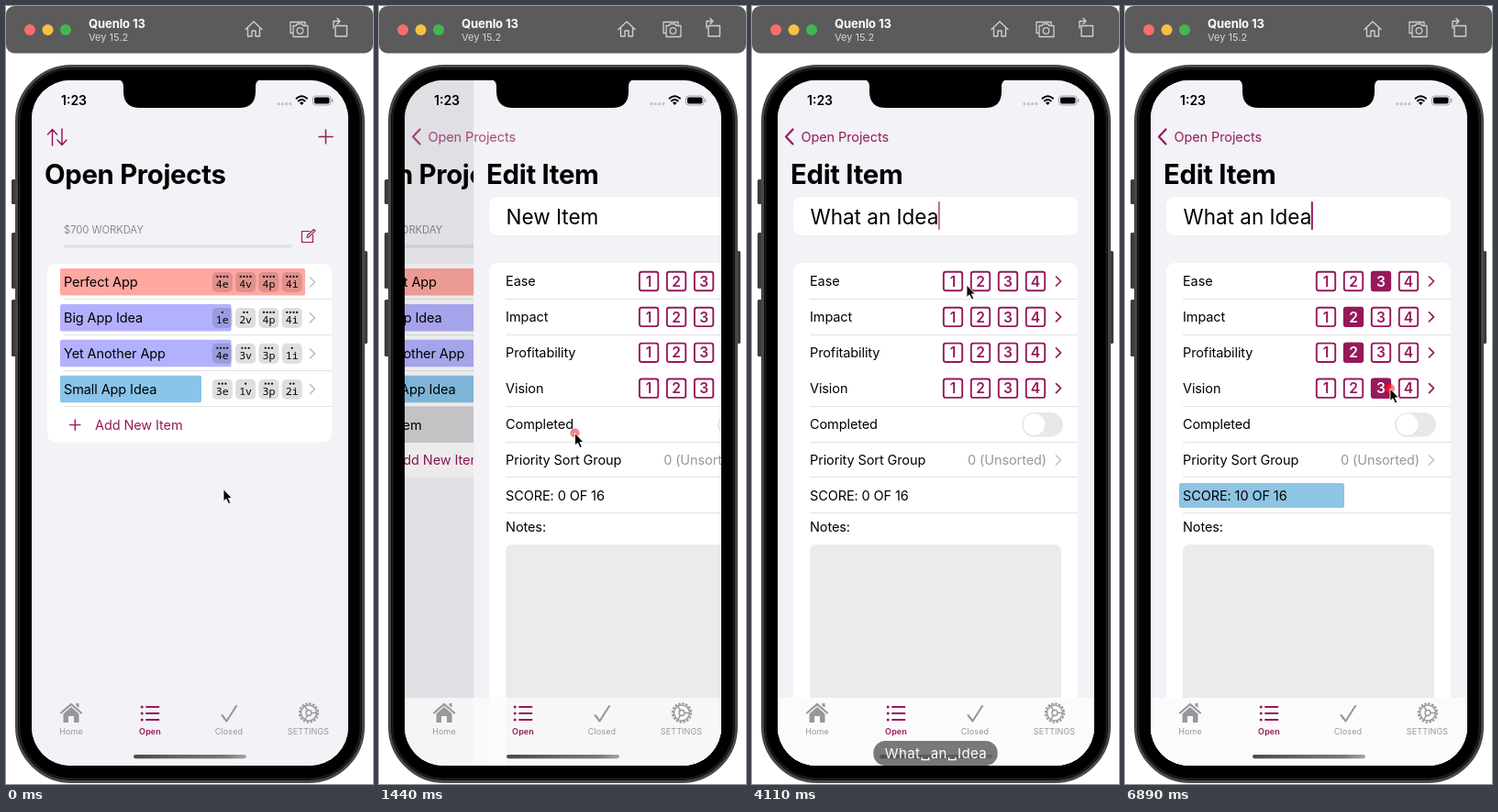
Recreate the animation shown at these times as an HTML page. Size 400 by 848 pixels, loop 7.39 s.

```html
<!DOCTYPE html>
<html lang="en">
<head>
<meta charset="utf-8">
<title>Item rating demo</title>
<style>
html, body { margin: 0; width: 100%; height: 100%; overflow: hidden; background: #fff; }
svg { display: block; width: 100%; height: 100%; }
text { font: 14.5px Inter, "Open Sans", sans-serif; letter-spacing: -.1px; white-space: pre; }
.title { font-size: 29.3px; font-weight: 700; letter-spacing: -.3px; }
.field { font-size: 22.5px; letter-spacing: 0; }
.chip { font: 11.6px "Noto Sans Mono", "DejaVu Sans Mono", monospace; letter-spacing: 0; }
.tab { font-size: 9px; letter-spacing: .1px; }
.active { font-weight: 600; }
.keys { font-size: 15px; letter-spacing: .4px; }
.num { font-size: 15.5px; font-weight: 600; letter-spacing: 0; }
.tint { fill: #96195a; }
.line { fill: none; stroke-linecap: round; stroke-linejoin: round; }
.glow { mix-blend-mode: screen; }
</style>
</head>
<body>
<svg id="stage" viewBox="0 0 400 848"></svg>
<script>
const TINT = '#96195a', BG = '#f2f2f7';
const TICK = 1000 / 9, LOOP = 7390, LAST = 62;
const PITCH = 38.9;
const PHRASE = 'What an Idea';

const rect = (x, y, w, h, r, fill, more = '') =>
  `<rect x="${x}" y="${y}" width="${w}" height="${h}" rx="${r}" fill="${fill}" ${more}/>`;
const dot = (x, y, r, fill, more = '') =>
  `<circle cx="${x}" cy="${y}" r="${r}" fill="${fill}" ${more}/>`;
const text = (x, y, s, more = '') => `<text x="${x}" y="${y}" ${more}>${s}</text>`;
const line = (d, color, w = 1.5, more = '') =>
  `<path class="line" d="${d}" stroke="${color}" stroke-width="${w}" ${more}/>`;
const group = (id, body, more = '') => `<g id="${id}" ${more}>${body}</g>`;
const chevron = (y, color) => line(`M331.5 ${y - 5}l5 5-5 5`, color, 1.7);
const rule = y => rect(63, y, 292, 1, 0, '#e2e2e5');

// Simulator title bar and phone body
function chrome() {
  const c = '#cfcfcf';
  return rect(0, 0, 400, 51.5, 9, '#5b5b5b') +
    dot(26, 26, 6, '#fa6d6c') + dot(45.5, 26, 6, '#f7c043') + dot(65, 26, 6, '#40b850') +
    text(90, 24, 'Quenlo 13', 'fill="#fff" style="font-size:13px;font-weight:700"') +
    text(90, 38, 'Vey 15.2', 'fill="#d4d4d4" style="font-size:11px;letter-spacing:0"') +
    line('M261 25.500l9-8.500 9 8.500M263.500 24v9h4.500v-6h4v6h4.500v-9', c, 1.4) +
    line('M312.500 29.500h-2.500v-12h16v2.500M313 21.500h3l1.500-2h5l1.500 2h5v12h-16z', c, 1.3) +
    dot(320.5, 27, 3.3, 'none', `stroke="${c}" stroke-width="1.300"`) +
    line('M360 21.500h11.500v11.500h-12.500v-11.500M357 24v-7.500h7M361 13.500l3 3-3 3', c, 1.4) +
    [[6, 189, 27], [6, 247, 61], [6, 320, 62], [389, 267, 101]]
      .map(([x, y, h]) => rect(x, y, 5, h, 1.5, '#3c3c3e')).join('') +
    rect(11.5, 65.5, 378, 780, 60, '#000', 'stroke="#48484a" stroke-width="3"') +
    rect(14.5, 68.5, 372, 774, 57, 'none', 'stroke="#1c1c1e" stroke-width="2"');
}

function status() {
  const bars = [297, 301.3, 305.6, 309.9].map(x => dot(x, 106.7, 1.6, '#c3c3c7')).join('');
  return text(60, 108, '1:23', 'style="font-size:14px;font-weight:600;letter-spacing:0"') + bars +
    line('M316.500 100.700q5.800-5 11.600 0M318.800 103.400q3.500-2.900 7 0', '#000', 1.9) +
    '<path d="M322.300 108l-2.300-2.600q2.300-1.700 4.600 0z"/>' +
    rect(334.5, 98, 19.5, 10, 3, 'none', 'stroke="#a5a5a8"') + rect(336, 99.5, 16.5, 7, 1.7, '#000') +
    rect(355, 101, 1.4, 4, .7, '#a5a5a8') +
    '<path d="M122 80q6 1 6 8v5q0 18 18 18h108q18 0 18-18v-5q0-7 6-8z"/>';
}

// One list row; row 0 is the topmost
function listRow(row, name, scores, width, fill) {
  const y = 301 + PITCH * row;
  const chips = scores.map((n, i) => {
    const x = 311.7 - 25.3 * (3 - i);
    let s = rect(x - 11, y - 11, 22, 22, 5, '#000', 'opacity=".13"') +
      text(x, y + 6, n + 'evpi'[i], 'class="chip" text-anchor="middle"');
    for (let j = 0; j < n; j++) s += dot(x + (j - (n - 1) / 2) * 3.6, y - 6, 1.15, '#111');
    return s;
  }).join('');
  return (width ? rect(59, y - 15, width, 29.5, 2, fill) : '') +
    text(63, y + 5, name) + chips + chevron(y, '#c3c3c7');
}

function listView() {
  return rect(28, 81, 345, 747, 0, BG) +
    line('M50.500 152v-17M45.500 140l5-5.500 5 5.500M61 134v17M56 146l5 5.500 5-5.500', TINT, 1.5) +
    line('M341 142.500h15M348.500 135v15', TINT, 1.5) +
    text(42, 194, 'Open Projects', 'class="title"') +
    text(63, 248, '$700 WORKDAY', 'fill="#8b8b90" style="font-size:11.3px"') +
    rect(63, 260, 249, 4, 2, '#e2e2e6') +
    line('M331 245.500h-8.500v12h12v-8M328 252.500l.5-2.500 7-6.500 1.500 1.500-6.800 6.800z', TINT, 1.1) +
    rect(45, 281, 310, 194.5, 9, '#fff', 'id="card"') +
    listRow(0, 'Perfect App', [4, 4, 4, 4], 267, '#ffa7a1') +
    listRow(1, 'Big App Idea', [1, 2, 4, 4], 186.5, '#b3b1fe') +
    listRow(2, 'Yet Another App', [4, 3, 3, 1], 186.5, '#b3b1fe') +
    listRow(3, 'Small App Idea', [3, 1, 3, 2], 154, '#89c4e9') +
    [319, 358, 397, 436].map(rule).join('') +
    group('fresh', rect(45, 437, 310, 39, 0, '#d3d3d7', 'id="press"') +
      listRow(4, 'New Item', [0, 0, 0, 0], 0)) +
    group('add', line('M69.500 456.600h11.500M75.250 450.850v11.500', TINT, 1.4) +
      text(97, 461.6, 'Add New Item', 'class="tint"')) +
    rect(28, 81, 345, 747, 0, '#000', 'id="shade"');
}

function ratingRow(name, row) {
  const y = 300 + PITCH * row;
  const boxes = [1, 2, 3, 4].map(n => {
    const x = 189 + 30 * n;
    return rect(x - 10.2, y - 10.2, 20.4, 20.4, 2.5, '#fff', `stroke="${TINT}" stroke-width="1.900"`) +
      text(x, y + 5.6, n, 'class="num tint" text-anchor="middle"');
  }).join('');
  const { pick } = RATINGS[row], x = 189 + 30 * pick;
  const on = rect(x - 11, y - 11, 22, 22, 3, TINT) +
    text(x, y + 5.6, pick, 'class="num" fill="#fff" text-anchor="middle"');
  return text(63, y + 5, name) + boxes + group('on' + row, on) + chevron(y, TINT);
}

function editView() {
  return rect(28, 81, 345, 747, 0, BG) + text(42, 194, 'Edit Item', 'class="title"') +
    rect(45, 208, 310, 42, 9, '#fff') +
    rect(63, 213, 100, 32, 0, TINT, 'id="select"') +
    text(63.5, 238, '', 'id="field" class="field"') +
    rect(0, 213, 2, 31, 1, TINT, 'id="caret"') +
    rect(45, 280, 310, 570, 9, '#fff') +
    [319, 358, 436, 475, 513, 552].map(rule).join('') +
    ['Ease', 'Impact', 'Profitability', 'Vision'].map(ratingRow).join('') +
    text(63, 461, 'Completed') + rect(294, 443, 45, 26.5, 13.25, '#e8e8ea') +
    dot(307.6, 456.7, 12.3, '#d8d8da') + dot(307.6, 456.2, 12, '#fff') +
    text(63, 500, 'Priority Sort Group') +
    text(321, 500, '0 (Unsorted)', 'fill="#97979b" text-anchor="end"') + chevron(495, '#c3c3c7') +
    rect(59, 520, 0, 27, 2, '#88cc8a', 'id="bar"') + text(63, 539, '', 'id="score"') +
    text(63, 573, 'Notes:') + rect(63, 587, 274, 250, 7, '#ebebeb');
}

function tabBar() {
  const g = '#98989c';
  const label = (x, s, color = g, cls = 'tab') =>
    text(x, 794, s, `class="${cls}" text-anchor="middle" fill="${color}"`);
  let gear = dot(330, 770.5, 10.2, 'none', `stroke="${g}" stroke-width="2" stroke-dasharray="2.4 1.6"`) +
    dot(330, 770.5, 8.5, 'none', `stroke="${g}" stroke-width="1.500"`) +
    dot(330, 770.5, 3, 'none', `stroke="${g}" stroke-width="1.300"`);
  for (const a of [0, 120, 240]) gear += line('M333 770.500h5.500', g, 1.4, `transform="rotate(${a} 330 770.500)"`);
  return rect(28, 754, 345, 75, 0, '#fbfbfc', 'id="tabBack"') +
    line('M60 770.500l11-9.500 11 9.500', g, 2.2) +
    `<path fill="${g}" d="M62.500 771.500l8.500-7.500 8.500 7.500v9.500h-5.500v-7h-6v7h-5.500zM76.500 760h3v5l-3-2.500z"/>` +
    [764, 771, 778].map(y => dot(148.2, y, 1.5, TINT) + line(`M153 ${y}h13.500`, TINT, 1.8)).join('') +
    line('M235.500 773l5 6.500 10.500-16.500', g, 2.1) + gear +
    label(71, 'Home') + label(157, 'Open', TINT, 'tab active') +
    label(243, 'Closed') + label(329.5, 'SETTINGS') +
    rect(139, 816, 123, 4.2, 2.1, 'url(#home)');
}

function menu() {
  const items = [[61, 'Cut'], [118, 'Copy'], [178, 'Paste'], [248, 'Look Up'], [299, '▸']];
  return rect(36.5, 166, 277, 32, 7, '#222') + '<path fill="#222" d="M104 198h19l-9.500 8z"/>' +
    items.map(([x, s]) => text(x, 187, s, 'text-anchor="middle" style="font-size:12.5px"')).join('');
}

// Times below are in ticks of a ninth of a second
const RATINGS = [{ pick: 3, at: 41 }, { pick: 2, at: 48 }, { pick: 2, at: 54 }, { pick: 3, at: 60 }];
const CLICKS = [5, 10, 17, 19, 40, 47, 53, 59];
const PATH = [
  [1, 237, 526.5], [3, 141, 456], [7, 141, 456], [10, 213.5, 465.5], [13, 213.5, 465.5], [15, 181, 239],
  [33, 181, 239], [37, 234, 304], [39, 290, 310], [43, 290, 310], [46, 256, 343],
  [50, 256, 343], [52, 255, 379], [53, 257, 382], [56, 257, 382], [58, 289, 417]
];

document.getElementById('stage').innerHTML =
  `<defs><clipPath id="screen">${rect(28, 81, 345, 747, 42, '#000')}</clipPath>
  <linearGradient id="home"><stop stop-color="#484a48"/><stop offset=".45" stop-color="#666a66"/>
  <stop offset=".8" stop-color="#777"/><stop offset="1" stop-color="#a5a5a5"/></linearGradient></defs>` +
  chrome() + '<g clip-path="url(#screen)">' + rect(28, 81, 345, 747, 0, BG) +
  group('list', listView()) + group('edit', editView()) +
  group('back', line('M44.500 134.500l-7.500 8 7.500 8', TINT, 2.2) +
    text(53.5, 148, 'Open Projects', 'class="tint"')) +
  group('menu', menu()) + tabBar() + status() + '</g>' +
  group('pill', rect(0, 801, 0, 27, 13, '#555', 'id="pillBack" opacity=".78"') +
    text(200.5, 820, '', 'id="keys" class="keys" fill="#fff" text-anchor="middle"')) +
  dot(0, 0, 0, '#000', 'id="tapDim" opacity=".5"') + dot(0, 0, 0, '#f00', 'id="tapGlow" class="glow"') +
  group('cursor', '<path d="M0 0v13.500l3-2.700 2.500 5.200 2.300-1-2.400-5h4z" stroke="#fff" stroke-width=".9"/>');

const el = {};
document.querySelectorAll('[id]').forEach(n => el[n.id] = n);
const set = (id, attrs) => { for (const a in attrs) el[id].setAttribute(a, attrs[a]); };
const clamp = v => Math.max(0, Math.min(1, v));
const easeOut = v => 1 - (1 - clamp(v)) ** 2.2;

function pointer(k) {
  let i = 0;
  while (i < PATH.length - 1 && PATH[i + 1][0] <= k) i++;
  const a = PATH[i], b = PATH[i + 1] || a;
  const u = b === a ? 0 : clamp((k - a[0]) / (b[0] - a[0]));
  return [a[1] + (b[1] - a[1]) * u, a[2] + (b[2] - a[2]) * u];
}

function caretAlpha(k) {
  if (k < 18 || (k >= 20 && k < 24)) return 0;
  const t = k * TICK - 4090;
  if (t < 0) return 1;
  const phase = t % 800;
  return phase < 60 ? .65 : phase < 360 ? 0 : 1;
}

// The tap mark halves green and blue beneath it and lifts red to full
function drawPointer(k) {
  const [cx, cy] = pointer(k);
  const since = k - CLICKS.filter(c => c <= k).pop();
  const r = since < 3.6 ? 23 * (1 - (since / 3.6) ** 1.35) : 0;
  set('cursor', { transform: `translate(${cx} ${cy})` });
  set('tapDim', { cx, cy, r });
  set('tapGlow', { cx, cy, r });
}

function drawList(k) {
  const grow = easeOut((k - 6) / 3), push = easeOut((k - 11) / 4);
  set('card', { height: 194.5 + PITCH * grow });
  set('add', { transform: `translate(0 ${PITCH * grow})` });
  set('fresh', { opacity: grow });
  set('press', { opacity: k >= 11 ? 1 : 0 });
  set('list', { transform: `translate(${-103 * push} 0)` });
  set('shade', { opacity: .1 * push });
  set('edit', { transform: `translate(${345 * (1 - push)} 0)` });
  set('back', { opacity: push });
  set('tabBack', { opacity: push });
}

function drawTyping(k) {
  const n = k < 24 ? 0 : Math.min(12, Math.round(1 + (k - 24) * 1.6));
  el.field.textContent = n ? PHRASE.slice(0, n) : 'New Item';
  set('caret', { x: 63 + el.field.getComputedTextLength(), opacity: caretAlpha(k) });
  set('select', { opacity: k >= 20 && k < 24 ? .2 : 0 });
  set('menu', { opacity: k === 24 ? .28 : k >= 21 && k < 24 ? .95 : 0, fill: k === 24 ? '#000' : '#fff' });
  el.keys.textContent = PHRASE.slice(0, n + 1).replace(/ /g, '␣');
  const w = el.keys.getComputedTextLength() + 24;
  set('pillBack', { x: 200 - w / 2, width: w });
  set('pill', { opacity: k < 24 || k > 41 ? 0 : k === 41 ? .5 : 1 });
}

function drawScore(k) {
  let total = 0, width = 0;
  RATINGS.forEach(({ pick, at }, i) => {
    set('on' + i, { opacity: k < at ? 0 : [.35, .75][k - at] || 1 });
    if (k < at) return;
    const goal = 10 + 17 * (total += pick);
    width += (goal - width) * clamp((k - at + 1) / 2);
  });
  el.score.textContent = `SCORE: ${total} OF 16`;
  set('bar', { width, fill: total < 8 ? '#88cc8a' : '#8ec4e4' });
}

function draw(ms) {
  const k = Math.min(LAST, Math.floor((ms % LOOP + 5) / TICK));
  if (k === draw.last) return;
  draw.last = k;
  drawPointer(k);
  drawList(k);
  drawTyping(k);
  drawScore(k);
}

const start = performance.now();
function loop() {
  draw(performance.now() - start);
  requestAnimationFrame(loop);
}
loop();
</script>
</body>
</html>
```
